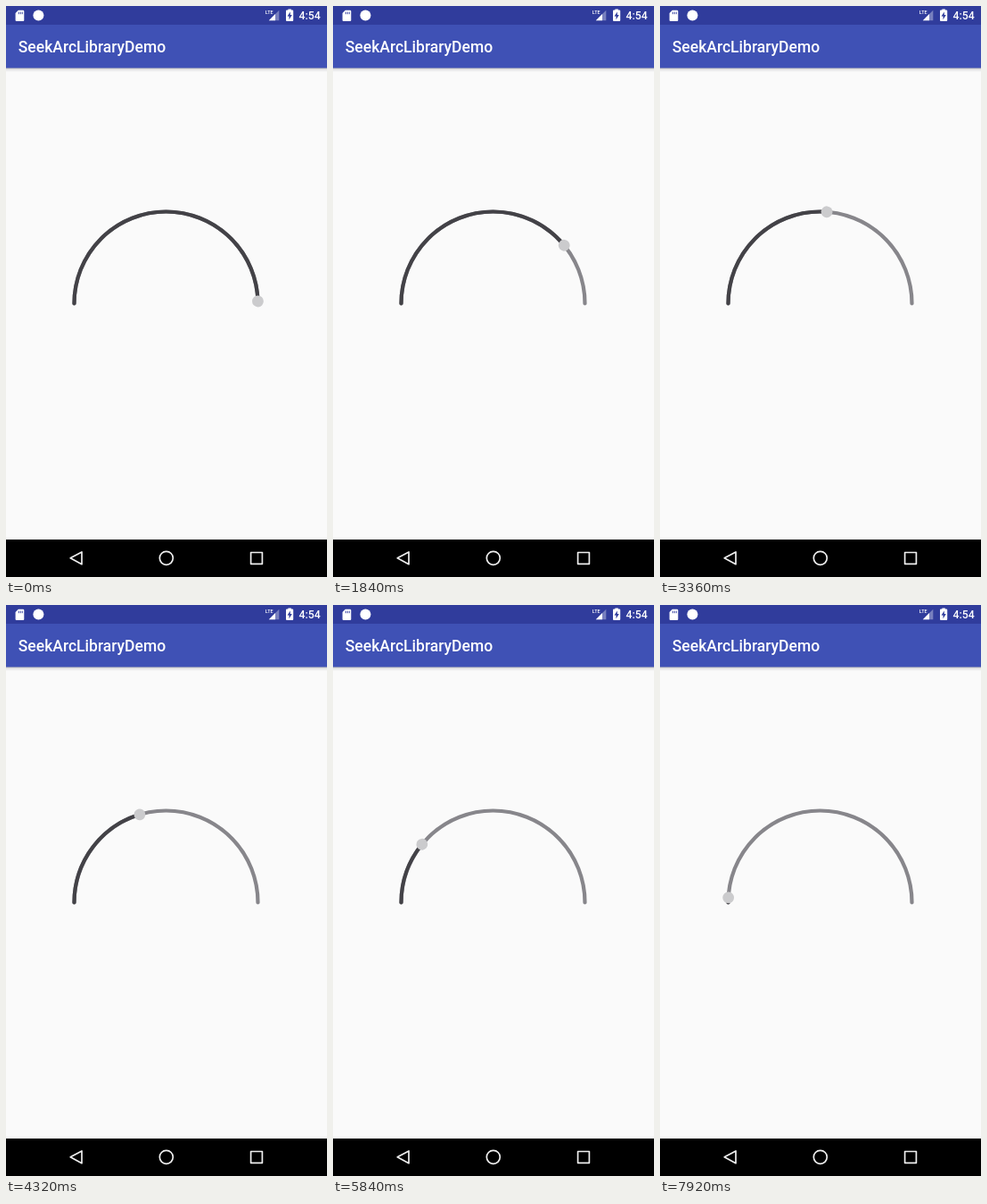
An HTML page for the animation above (8000 ms loop, 360 px wide and 640 px high).

```html
<!DOCTYPE html>
<html lang="en">
<head>
<meta charset="utf-8">
<title>Seek arc</title>
<style>
  @property --angle {
    syntax: "<number>";
    inherits: true;
    initial-value: 178.6;
  }
  html, body {
    margin: 0;
    width: 100%;
    height: 100%;
    overflow: hidden;
    background: #fafafa;
  }
  svg { display: block; width: 360px; height: 640px; }
  text { font-family: Roboto, sans-serif; font-weight: 500; fill: #fff; }

  .seek { animation: drag 8s infinite; }
  .track, .progress { fill: none; stroke-width: 4.2; stroke-linecap: round; }
  .track { stroke: #87868b; }
  .progress { stroke: #434247; stroke-dasharray: var(--angle) 400; }
  .thumb {
    fill: #cbcbcd;
    transform-origin: 179.5px 333.5px;
    transform: rotate(calc(var(--angle) * 1deg));
  }

  /* 1% is one 80 ms tick */
  @keyframes drag {
    0%   { --angle: 178.6; animation-timing-function: steps(12); }
    12%  { --angle: 161.3; animation-timing-function: steps(11); }
    23%  { --angle: 140.7; animation-timing-function: steps(10); }
    33%  { --angle: 116.1; animation-timing-function: steps(9); }
    42%  { --angle: 94.2;  animation-timing-function: steps(12); }
    54%  { --angle: 73.3;  animation-timing-function: steps(19); }
    73%  { --angle: 39.3;  animation-timing-function: steps(15); }
    88%  { --angle: 14.6;  animation-timing-function: steps(11); }
    99%, 100% { --angle: 3.1; }
  }
</style>
</head>
<body>
<svg viewBox="0 0 360 640">
  <defs>
    <linearGradient id="shadow" x2="0" y2="1">
      <stop offset="0" stop-color="#000" stop-opacity=".3"/>
      <stop offset=".4" stop-color="#000" stop-opacity=".09"/>
      <stop offset="1" stop-color="#000" stop-opacity="0"/>
    </linearGradient>
  </defs>

  <rect width="360" height="640" fill="#fafafa"/>
  <rect y="69" width="360" height="5" fill="url(#shadow)"/>
  <rect width="360" height="69.5" fill="#3f51b5"/>
  <rect width="360" height="21" fill="#303c9c"/>

  <!-- status bar -->
  <path d="M13.8 4.8H19.2Q20.3 4.8 20.3 5.9V15.9Q20.3 17 19.2 17H11.7Q10.6 17 10.6 15.9V8Z" fill="#fff"/>
  <path d="M14.3 6.6v2.6M16.3 6.6v2.6M18.3 6.6v2.6" stroke="#303c9c" stroke-width=".9"/>
  <circle cx="36.4" cy="10.5" r="6" fill="#fff"/>
  <path d="M306.3 4.8V16.3H294.8Z" fill="#fff" opacity=".35"/>
  <path d="M302 9.1V16.3H294.8Z" fill="#fff"/>
  <text x="290.8" y="9.2" font-size="5.4">LTE</text>
  <path d="M316.4 4.6V3.4H319.8V4.6H321.2Q322.2 4.6 322.2 5.6V16Q322.2 17 321.2 17H315Q314 17 314 16V5.6Q314 4.6 315 4.6Z" fill="#fff"/>
  <path d="M318.8 6.4L315.5 11.6H317.5V15.2L320.8 10H318.8Z" fill="#303c9c"/>
  <text x="328.6" y="15" font-size="12.25">4:54</text>

  <text x="13.8" y="52" font-size="17.5">SeekArcLibraryDemo</text>

  <g class="seek">
    <path class="track" d="M76.5 333.5A103 103 0 0 1 282.5 333.5"/>
    <path class="progress" pathLength="180" d="M76.5 333.5A103 103 0 0 1 282.5 333.5"/>
    <circle class="thumb" cx="76.5" cy="333.5" r="6.4"/>
  </g>

  <!-- navigation bar -->
  <rect y="598" width="360" height="42" fill="#000"/>
  <g fill="none" stroke="#eee" stroke-width="1.7" stroke-linejoin="round">
    <path d="M72.2 618.8L85 611.9V625.7Z"/>
    <circle cx="179.8" cy="618.8" r="7.5"/>
    <rect x="274.6" y="612.5" width="12.8" height="12.8"/>
  </g>
</svg>
</body>
</html>
```
